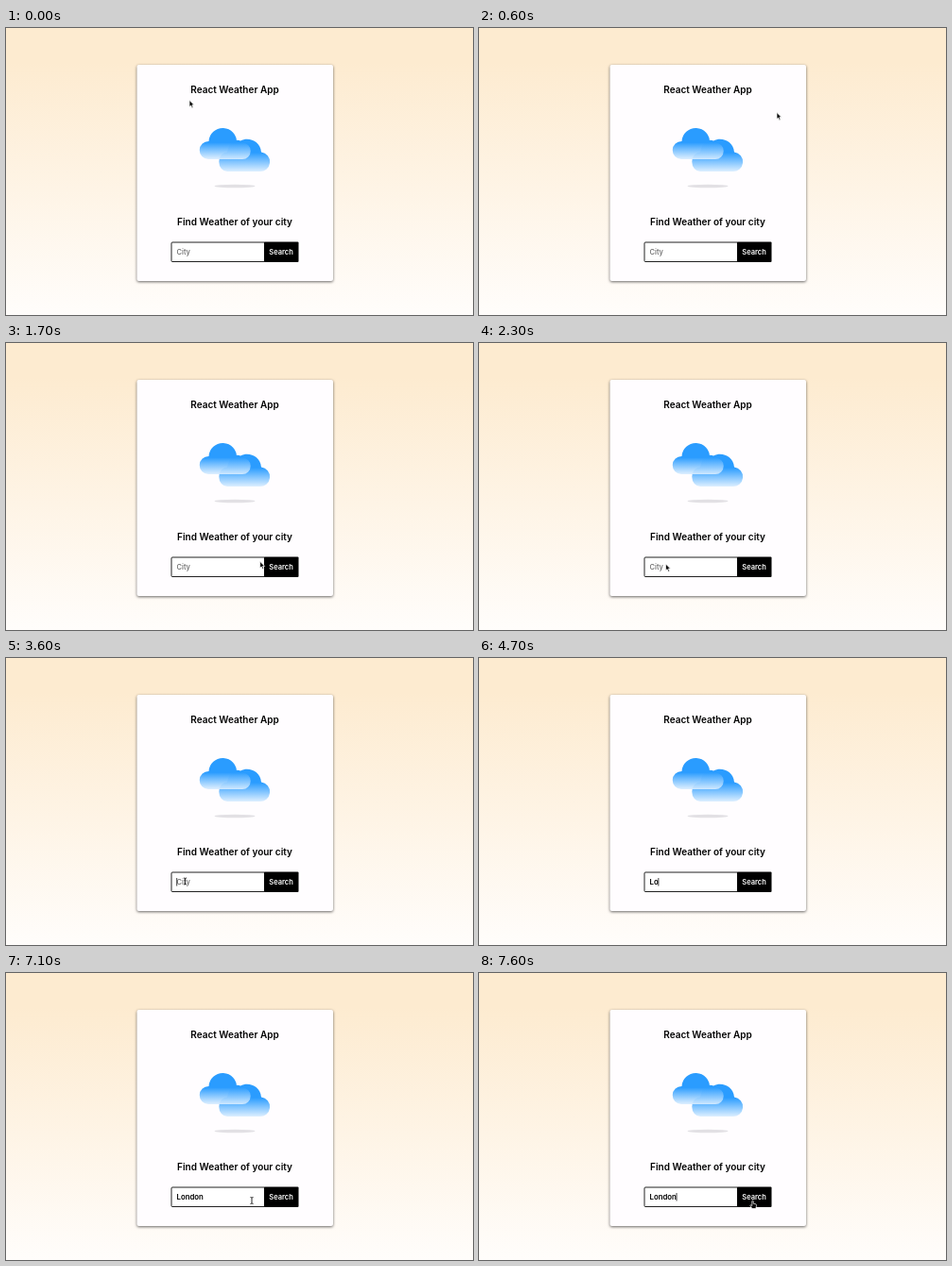
An HTML page for the animation above (8000 ms loop, 494x304 px).

```html
<!DOCTYPE html>
<html lang="en">
<head>
<meta charset="utf-8">
<title>Weather search</title>
<style>
  html, body { margin: 0; width: 100%; height: 100%; overflow: hidden; }
  svg { display: block; width: 100vw; height: 100vh; }
  text { font: 600 10px Inter, "Open Sans", sans-serif; }
  .mid { text-anchor: middle; }
  .small { font-size: 7.5px; }
  .card { fill: #fffdff; filter: drop-shadow(0 1px 1.5px #0009); }
  .cursor { fill: #080808; stroke: #fff; stroke-width: .7; stroke-linejoin: round; }
</style>
</head>
<body>
<svg viewBox="0 0 494 304">
  <defs>
    <linearGradient id="sky" x2="0" y2="1">
      <stop stop-color="#fdebd0"/><stop offset=".12" stop-color="#fdebd0"/>
      <stop offset="1" stop-color="#fffdfb"/>
    </linearGradient>
    <linearGradient id="back" gradientUnits="userSpaceOnUse" x1="0" y1="118" x2="0" y2="153">
      <stop stop-color="#2a9cff"/><stop offset=".4" stop-color="#2a9cff"/>
      <stop offset="1" stop-color="#e6f3ff"/>
    </linearGradient>
    <linearGradient id="front" gradientUnits="userSpaceOnUse" x1="0" y1="106" x2="0" y2="140">
      <stop stop-color="#2a9cff"/><stop offset=".45" stop-color="#2a9cff"/>
      <stop offset="1" stop-color="#e4f2ff" stop-opacity=".9"/>
    </linearGradient>
  </defs>
  <rect width="494" height="304" fill="url(#sky)"/>
  <rect class="card" x="138.5" y="39" width="207.5" height="229" rx="2"/>
  <text class="mid" x="242" y="68.5">React Weather App</text>

  <path fill="url(#back)" d="M234 152a8.5 10 0 0 1 0-20.5C236 121 243 117 248 119.5C257 115 269 120 270 131.5A10.3 10.3 0 0 1 268 152Z"/>
  <path fill="url(#front)" d="M214 139a9.4 9.4 0 0 1 .5-19A14.7 14.7 0 0 1 244 121.500h6a8.75 8.75 0 0 1 0 17.500Z"/>
  <ellipse cx="242" cy="167.500" rx="21.500" ry="1.700" fill="#e2e0e4"/>

  <text class="mid" x="242" y="209">Find Weather of your city</text>
  <rect x="175" y="227" width="99" height="20.500" rx="1" fill="#fff" stroke="#222"/>
  <rect x="273" y="226.500" width="36.500" height="21.500" rx="1" fill="#000"/>
  <text class="mid small" x="291" y="240" fill="#fff">Search</text>
  <text id="city" class="small" x="180.500" y="240"></text>
  <path id="caret" d="M0 233v8.500" stroke="#111" stroke-width=".8"/>

  <path id="arrow" class="cursor" d="M0 0V7L1.600 5.600L2.800 8.200L4 7.700L2.900 5.100H5Z"/>
  <path id="beam" d="M-1.500-3.500Q0-3.500 0-2.600Q0-3.500 1.500-3.500M0-2.600V2.600M-1.500 3.500Q0 3.500 0 2.600Q0 3.500 1.500 3.500" fill="none" stroke="#111" stroke-width=".9"/>
  <path id="hand" class="cursor" d="M-.7 0Q0-.8.700 0V2.700L3.500 3.400Q4.200 3.700 4 5L3.300 8H-.6L-2.600 5Q-2.600 4-1.700 4.300L-.7 5Z"/>
</svg>
<script>
  const LOOP = 8000, STEP = 100;
  const $ = id => document.getElementById(id);
  const show = (el, on) => el.style.display = on ? "" : "none";

  // time, x, y of the pointer
  const path = [
    [0, 194, 76.5], [300, 311, 74], [500, 311, 74], [700, 319, 105],
    [1000, 206, 228], [1300, 185, 227], [1500, 188, 228], [1800, 309, 233],
    [2300, 197.5, 234], [2900, 197.5, 234], [3300, 189.5, 236.5],
    [6700, 189.5, 236.5], [7100, 260, 241], [7400, 286, 245], [7600, 289.5, 241.5]
  ];
  const keys = [4400, 4700, 4900, 5200, 5400, 5600];

  function pointerAt(t) {
    const i = path.findIndex(p => p[0] > t);
    if (i < 0) return path.at(-1).slice(1);
    const [t0, x0, y0] = path[i - 1], [t1, x1, y1] = path[i];
    const k = (t - t0) / (t1 - t0);
    return [x0 + (x1 - x0) * k, y0 + (y1 - y0) * k];
  }

  function pointerKind(t, x) {
    if (t < 3200) return "arrow";
    if (t >= 4400 && t < 6800) return "none";
    return x > 273 ? "hand" : "beam";
  }

  function caretOn(t) {
    if (t < 3600) return false;
    const since = t < 4400 ? 3600 : 5600;
    return t >= 4400 && t < 5600 || Math.floor((t - since) / 500) % 2 === 0;
  }

  function draw(now) {
    const t = Math.floor(now % LOOP / STEP) * STEP;
    const [x, y] = pointerAt(t), kind = pointerKind(t, x);
    for (const id of ["arrow", "beam", "hand"]) {
      show($(id), id === kind);
      $(id).setAttribute("transform", `translate(${x} ${y})`);
    }
    const typed = "London".slice(0, keys.filter(k => k <= t).length);
    const city = $("city");
    city.textContent = typed || "City";
    city.style.fill = typed ? "#000" : "#666";
    city.style.fontWeight = typed ? 600 : 500;
    city.style.fontSize = typed ? "7.8px" : "7.5px";
    const end = typed ? city.getComputedTextLength() : 0;
    $("caret").setAttribute("transform", `translate(${180.7 + end} 0)`);
    show($("caret"), caretOn(t));
  }

  const start = performance.now();
  function tick() {
    draw(performance.now() - start);
    requestAnimationFrame(tick);
  }
  tick();
</script>
</body>
</html>
```
